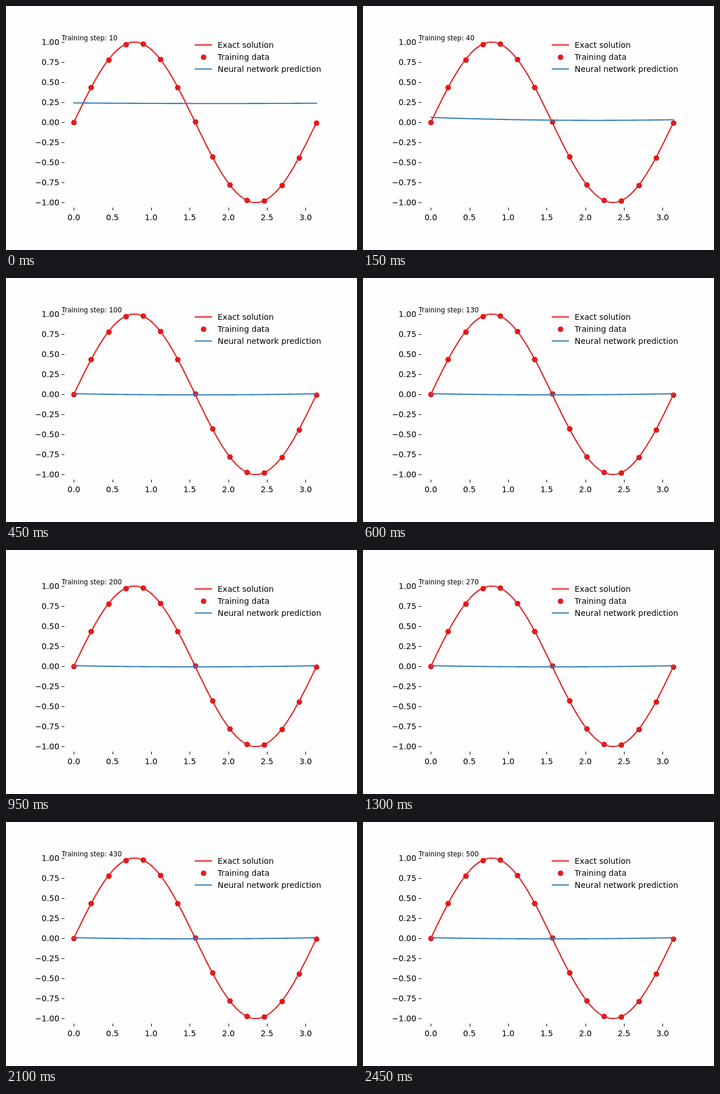
These frames come from a looping animation (612 px wide and 426 px high, 2.5 s). An HTML page with a canvas:

```html
<!DOCTYPE html>
<html lang="en">
<head>
<meta charset="utf-8">
<style>
html, body { margin: 0; height: 100%; overflow: hidden; background: #fefefe; }
canvas { display: block; }
</style>
</head>
<body>
<canvas id="plot" width="612" height="426"></canvas>
<script>
const ctx = document.getElementById('plot').getContext('2d');
const RED = '#e41a1c', BLUE = '#377eb8', INK = '#000';
const FRAME = 50, FRAMES = 50;
const px = x => 118.25 + x * 134.72;
const py = y => 203.05 - y * 140;

// Damped swing of a point on the prediction towards its resting height.
const settle = (rest, offset, speed, fade, n) =>
  rest + offset * Math.cos(speed * n) * Math.exp(-((n / fade) ** 2));

function curve(color, f) {
  ctx.strokeStyle = color;
  ctx.lineWidth = 2.08;
  ctx.lineCap = 'square';
  ctx.lineJoin = 'round';
  ctx.beginPath();
  for (let i = 0; i <= 300; i++) {
    const u = i / 300;
    ctx.lineTo(px(u * Math.PI), f(u));
  }
  ctx.stroke();
}

// Dots sit on whole pixels.
function dot(x, y) {
  ctx.fillStyle = RED;
  ctx.beginPath();
  ctx.arc(Math.round(x) + 0.5, Math.round(y) + 0.5, 4.86, 0, 2 * Math.PI);
  ctx.fill();
}

function bar(color, x, y, width, height) {
  ctx.fillStyle = color;
  ctx.fillRect(x, y, width, height);
}

function text(label, x, y, align = 'left', size = 13.89) {
  ctx.font = size + 'px "DejaVu Sans", sans-serif';
  ctx.textAlign = align;
  ctx.fillStyle = INK;
  ctx.fillText(label, x, y);
}

function axes() {
  for (let i = -4; i <= 4; i++) {
    const y = Math.round(py(i / 4));
    bar(INK, 97, y, 5, 1);
    text((i < 0 ? '\u2212' : '') + Math.abs(i / 4).toFixed(2), 93, y + 5, 'right');
  }
  for (let i = 0; i <= 6; i++) {
    const x = px(i / 2);
    bar(INK, Math.round(x), 352, 1, 5);
    text((i / 2).toFixed(1), x, 374, 'center');
  }
}

function legend() {
  bar(RED, 329, 67, 30, 2);
  dot(344, 89);
  bar(BLUE, 329, 109, 30, 2);
  ['Exact solution', 'Training data', 'Neural network prediction']
    .forEach((label, i) => text(label, 369, 73 + 21 * i));
}

function draw(n) {
  bar('#fefefe', 0, 0, 612, 426);
  for (let i = 0; i < 15; i++) {
    const x = i * (Math.PI - 0.0045) / 14;
    dot(px(x), py(Math.sin(2 * x)));
  }
  curve(RED, u => py(Math.sin(2 * Math.PI * u)));

  const left = settle(202, -32.8, 0.33, 3.2, n);
  const middle = settle(204, -33.8, 0.43, 3.6, n);
  const right = settle(202, -32.3, 0.46, 4, n);
  const bend = 2 * (left + right - 2 * middle);
  curve(BLUE, u => left + (right - left) * u - bend * u * (1 - u));

  axes();
  legend();
  text('Training step: ' + (n + 1) * 10, 97, 60, 'left', 11.66);
}

function tick() {
  draw(Math.floor(performance.now() / FRAME) % FRAMES);
  requestAnimationFrame(tick);
}
tick();
</script>
</body>
</html>
```
